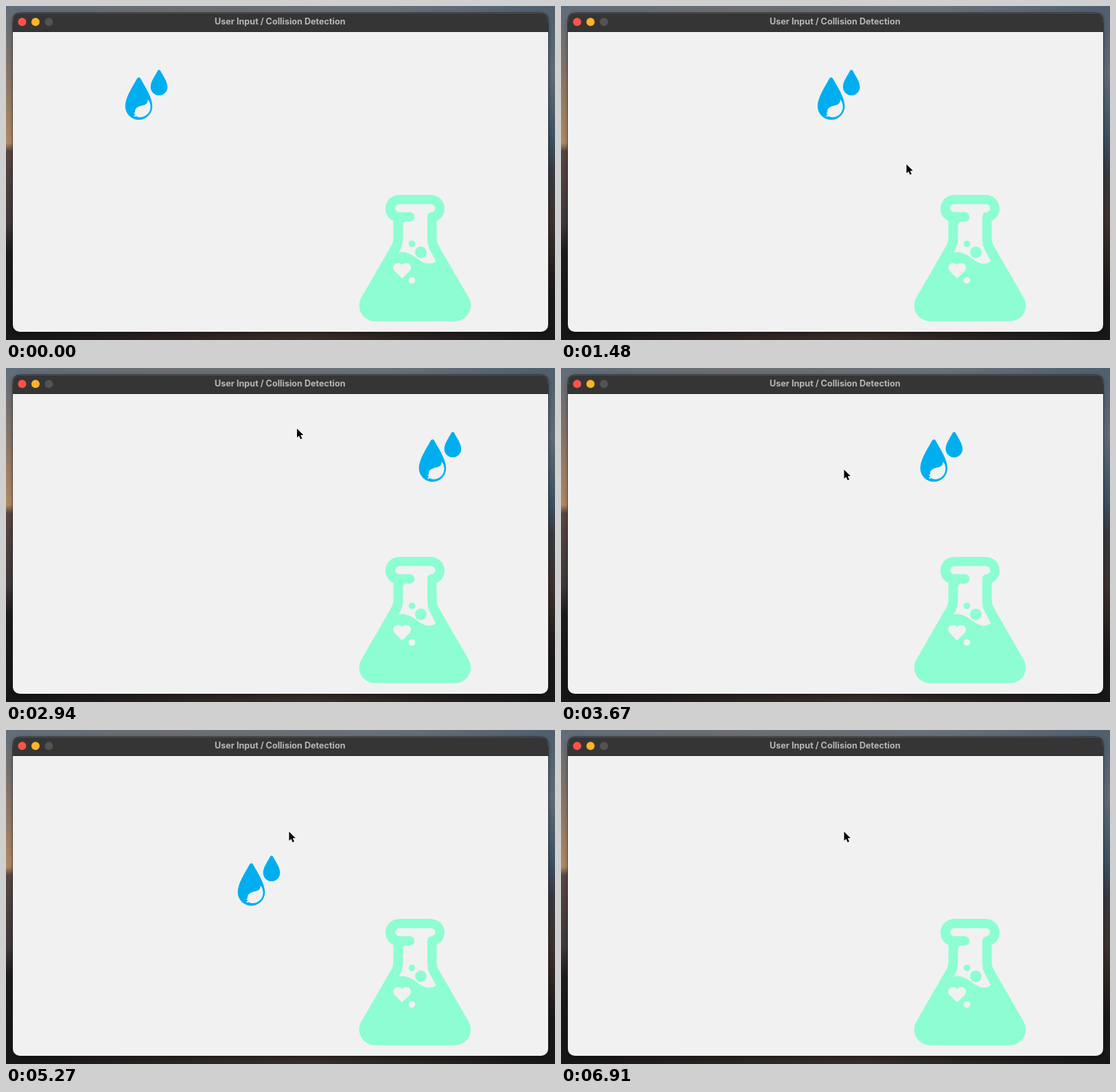
Animation of 800 by 488 pixels, one loop 6.94 s. Source, as an HTML page:

```html
<!DOCTYPE html>
<html lang="en">
<head>
<meta charset="utf-8">
<title>Collision Detection</title>
<style>
  html, body { margin: 0; width: 100%; height: 100%; overflow: hidden; background: #1c191a; }
  svg { display: block; width: 800px; height: 488px; }
  text { font: 700 12.6px Inter, "Liberation Sans", sans-serif; fill: #b8b8b8; text-anchor: middle; }
</style>
</head>
<body>
<svg viewBox="0 0 800 488">
  <defs>
    <linearGradient id="sky">
      <stop offset="0" stop-color="#5f6d79"/><stop offset=".3" stop-color="#6c6e72"/>
      <stop offset=".7" stop-color="#68717a"/><stop offset="1" stop-color="#4f5f6d"/>
    </linearGradient>
    <linearGradient id="west" x2="0" y2="1">
      <stop offset="0" stop-color="#5f6d79"/><stop offset=".2" stop-color="#87766b"/>
      <stop offset=".41" stop-color="#b38a62"/><stop offset=".435" stop-color="#574842"/>
      <stop offset=".65" stop-color="#41383a"/><stop offset=".74" stop-color="#1d1b1d"/>
      <stop offset="1" stop-color="#171518"/>
    </linearGradient>
    <linearGradient id="east" x2="0" y2="1">
      <stop offset="0" stop-color="#4f5f6d"/><stop offset=".2" stop-color="#626d78"/>
      <stop offset=".4" stop-color="#3c5163"/><stop offset=".5" stop-color="#38393f"/>
      <stop offset=".65" stop-color="#3d322e"/><stop offset=".85" stop-color="#1d1a1a"/>
      <stop offset="1" stop-color="#191719"/>
    </linearGradient>
    <linearGradient id="ground">
      <stop offset="0" stop-color="#171518"/><stop offset=".3" stop-color="#2b2422"/>
      <stop offset=".55" stop-color="#3a2f2a"/><stop offset=".75" stop-color="#2a2422"/>
      <stop offset="1" stop-color="#191719"/>
    </linearGradient>
    <filter id="shade" x="-5%" y="-5%" width="110%" height="110%"><feGaussianBlur stdDeviation="4"/></filter>
    <clipPath id="frame"><rect x="10" y="10" width="780" height="466" rx="10"/></clipPath>
  </defs>

  <!-- desktop -->
  <rect width="800" height="14" fill="url(#sky)"/>
  <rect width="14" height="488" fill="url(#west)"/>
  <rect x="786" width="14" height="488" fill="url(#east)"/>
  <rect y="474" width="800" height="14" fill="url(#ground)"/>
  <rect x="10" y="13" width="780" height="466" rx="10" opacity=".35" filter="url(#shade)"/>

  <!-- window -->
  <rect x="9.5" y="9.5" width="781" height="467" rx="10.5" fill="#1b1b1c"/>
  <g clip-path="url(#frame)">
    <path fill="#f1f1f1" d="M10 38H790V476H10Z"/>
    <path fill="#8dfdd2" fill-rule="evenodd" d="M573 276H619A20 20 0 0 1 639 296C639 305 634 311 627.5 314V338Q627.5 345 631 351L673 424C684 441 672 460.5 654 460.5H538C520 460.5 508 441 519 424L561 351Q564.5 345 564.5 338V314C558 311 553 305 553 296A20 20 0 0 1 573 276Z
      M573 289.5A5.9 5.9 0 0 0 573 301.3H588.5A6.9 6.9 0 0 1 588.5 315.1H584Q578.5 315 578.5 320V339Q578.5 351 572 360C586 357 596 367 605 373Q617 380 626.5 373L617 355Q614 349 614 342V308Q614 302 619.5 301.3A5.9 5.9 0 0 0 619.5 289.5Z
      M577.2 398L566 387C562 381 566 375.5 571 375.5Q575 375.5 577.2 378.5Q579.5 375.5 583.5 375.5C588.5 375.5 592.5 381 588.5 387Z"/>
    <circle cx="591.5" cy="347.5" r="4.8" fill="#8dfdd2"/>
    <circle cx="604.5" cy="360" r="8.4" fill="#8dfdd2"/>
    <circle cx="591.5" cy="401" r="4.8" fill="#f1f1f1"/>
    <g id="drops" fill="#00aeef">
      <path d="M193.5 104.2Q195.4 104.2 197 107.5C203 119 213 133 213.3 146.5A19.8 19.8 0 0 1 173.7 146.5C174 133 184 119 190 107.5Q191.6 104.2 193.5 104.2Z"/>
      <path d="M223 93.2Q224.4 93.2 225.4 95.2C229 102.5 235.2 110 235.3 118.3A12.3 12.3 0 0 1 210.7 118.3C210.8 110 217 102.5 220.6 95.2Q221.6 93.2 223 93.2Z"/>
      <path fill="#f1f1f1" d="M206.8 136.5C211 142 212 149 208.5 155C204.5 162 195 164.5 190 161Q188 162 185.8 161.2L188.5 158.3L186 157Q188.5 156 188 152.5C190 147 196 146 201 144.8C205 143.5 207 140.5 206.8 136.5Z"/>
    </g>
    <path fill="#353535" d="M10 10H790V38H10Z"/>
    <path fill="#292929" d="M10 37H790V38H10Z"/>
  </g>
  <path d="M10.5 24V20A9.5 9.5 0 0 1 20 10.5H780A9.5 9.5 0 0 1 789.5 20V24" fill="none" stroke="#505050"/>
  <circle cx="23.5" cy="23.3" r="6" fill="#ff524b"/>
  <circle cx="43" cy="23.3" r="6" fill="#fdb427"/>
  <circle cx="62.5" cy="23.3" r="6" fill="#535353"/>
  <text x="399.3" y="27.3">User Input / Collision Detection</text>
  <path id="cursor" d="M0 0V13.2L3 10.5L5.2 15.4L7.5 14.4L5.3 9.6H9.4Z" stroke="#fff" stroke-width="1.4" paint-order="stroke"/>
</svg>
<script>
const LOOP = 6940;

// Keys are [time, x, y]; positions run linearly between them.
const dropKeys = [
  [0, 0, 0], [340, 0, 0], [1480, 200, 0], [2240, 333, 0], [2780, 428, 0], [3220, 428, 0],
  [3670, 350, 0], [4610, 190, 0], [4760, 164, 0], [4850, 164, 0], [5940, 164, 234], [6840, 164, 427]
];
const cursorKeys = [
  [0, 545, 500], [1100, 545, 500], [1480, 503.5, 231.5], [2240, 455.5, 9.5],
  [2650, 440, 5], [3150, 412.5, 148.5]
];

function at(keys, t) {
  const i = keys.findIndex(k => k[0] > t);
  if (i < 0) return keys[keys.length - 1].slice(1);
  const [t0, x0, y0] = keys[i - 1], [t1, x1, y1] = keys[i];
  const p = (t - t0) / (t1 - t0);
  return [x0 + (x1 - x0) * p, y0 + (y1 - y0) * p];
}

const place = (id, pos) =>
  document.getElementById(id).setAttribute("transform", `translate(${pos})`);

function draw() {
  const t = performance.now() % LOOP;
  place("drops", at(dropKeys, t));
  place("cursor", at(cursorKeys, t));
  requestAnimationFrame(draw);
}
draw();
</script>
</body>
</html>
```
